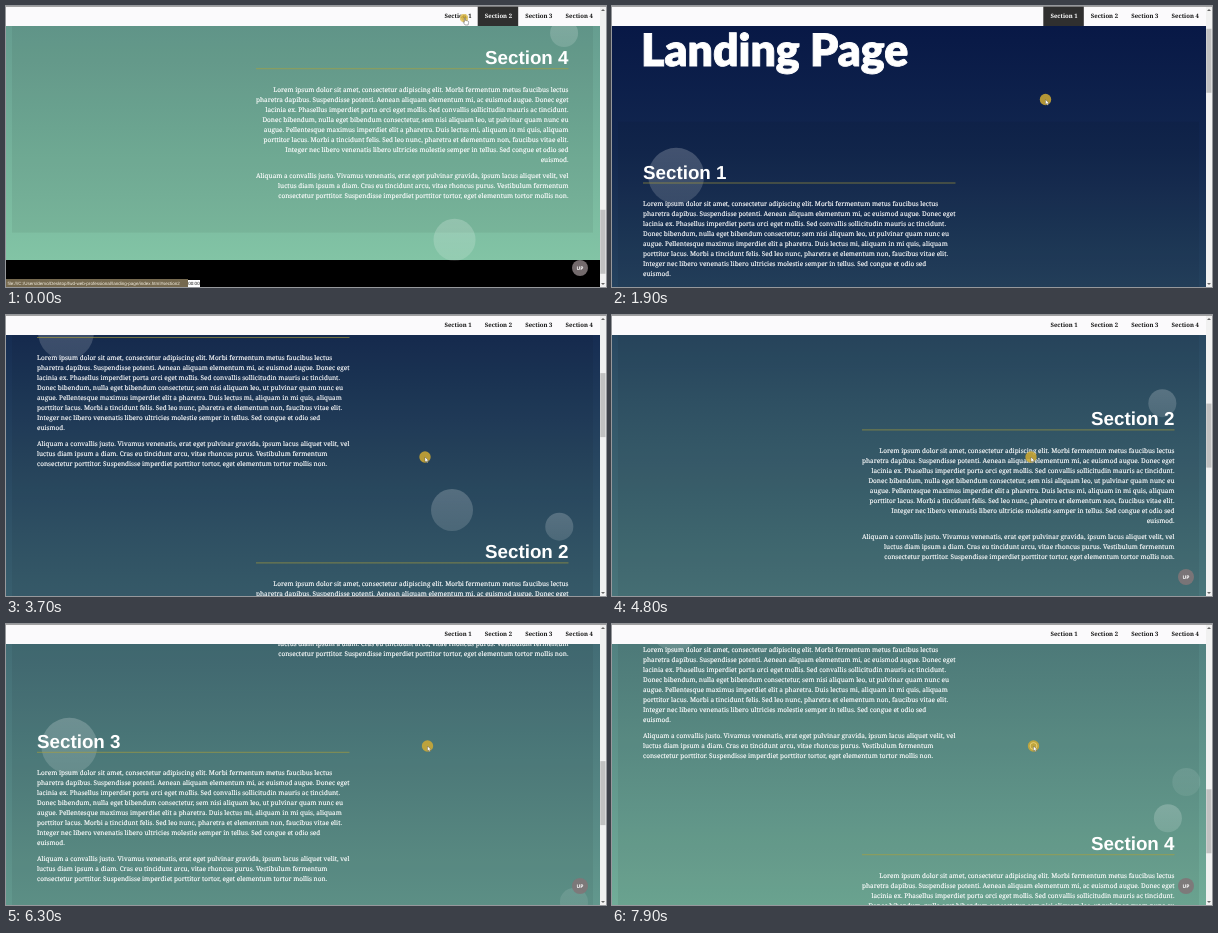
Animation of 600x281 px, one loop 8 s. Source, as an HTML page:

```html
<!DOCTYPE html>
<html lang="en">
<head>
<meta charset="utf-8">
<title>Landing page scroll</title>
<style>
  html, body { margin: 0; width: 100%; height: 100%; overflow: hidden; background: #000; }
  svg { display: block; width: 600px; height: 281px; }
  text { text-rendering: geometricPrecision; white-space: pre; }
  .title { font: 900 44.6px Lato, "Open Sans", sans-serif; fill: #fff; stroke: #fff; stroke-width: .9px; }
  .head { font: bold 18.8px "Liberation Sans", Arial, sans-serif; fill: #fff; }
  .copy { font: 6.45px "Noto Serif", serif; fill: #fff; stroke: #fff; stroke-width: .14px; }
  .link { font: bold 6px "Noto Serif", serif; }
  .up { font: bold 5px "Open Sans", sans-serif; fill: #fff; }
  .status { font: 4.55px "Liberation Sans", Arial, sans-serif; }
</style>
</head>
<body>
<svg id="stage" viewBox="0 0 600 281">
  <defs>
    <linearGradient id="sky" x1="0" y1="0" x2="0" y2="1">
      <stop offset="0" stop-color="#000d3f"/>
      <stop offset=".2" stop-color="#12274f"/>
      <stop offset=".4" stop-color="#315468"/>
      <stop offset="1" stop-color="#82c4a5"/>
    </linearGradient>
    <linearGradient id="bubble" x1="0" y1="0" x2="0" y2="1">
      <stop offset="0" stop-color="#fff" stop-opacity=".21"/>
      <stop offset="1" stop-color="#fff" stop-opacity=".14"/>
    </linearGradient>
  </defs>
</svg>
<script>
const LOOP = 8000, STEP = 100;
const FIRST_RULE = 254, PITCH = 225.4, PAGE_END = 1122;

const COPY = [
  "Lorem ipsum dolor sit amet, consectetur adipiscing elit. Morbi fermentum metus faucibus lectus",
  "pharetra dapibus. Suspendisse potenti. Aenean aliquam elementum mi, ac euismod augue. Donec eget",
  "lacinia ex. Phasellus imperdiet porta orci eget mollis. Sed convallis sollicitudin mauris ac tincidunt.",
  "Donec bibendum, nulla eget bibendum consectetur, sem nisi aliquam leo, ut pulvinar quam nunc eu",
  "augue. Pellentesque maximus imperdiet elit a pharetra. Duis lectus mi, aliquam in mi quis, aliquam",
  "porttitor lacus. Morbi a tincidunt felis. Sed leo nunc, pharetra et elementum non, faucibus vitae elit.",
  "Integer nec libero venenatis libero ultricies molestie semper in tellus. Sed congue et odio sed",
  "euismod.",
  "Aliquam a convallis justo. Vivamus venenatis, erat eget pulvinar gravida, ipsum lacus aliquet velit, vel",
  "luctus diam ipsum a diam. Cras eu tincidunt arcu, vitae rhoncus purus. Vestibulum fermentum",
  "consectetur porttitor. Suspendisse imperdiet porttitor tortor, eget elementum tortor mollis non."
];

// [time, value...]
const SCROLL = [[0, 868], [200, 868], [300, 800], [400, 600], [500, 370], [600, 240], [700, 192],
  [1300, 192], [1800, 77.5], [2900, 77.5], [3700, 232], [4800, 365], [6300, 577], [7900, 700]];
const POINTER = [[0, 458, 12], [900, 458.5, 12], [1100, 458, 12], [1500, 448, 45], [2300, 419, 142],
  [4900, 419, 142], [5800, 421.5, 122]];

// Orbiting bubbles: section, centre x, y from the rule, radius, start angle, degrees per second
const BUBBLES = [
  { sec: 0, x: 60, y: -11, r: 28, phase: -22, speed: 225 },
  { sec: 0, x: 446, y: 179, r: 21, phase: 67, speed: -237 },
  { sec: 1, x: 555, y: -30, r: 14, phase: 9, restart: 141, speed: 225 },
  { sec: 2, x: 60, y: -11, r: 28, phase: 79, speed: 225 },
  { sec: 2, x: 569, y: 156, r: 14, phase: -46, speed: -180, alpha: .5 },
  { sec: 3, x: 555, y: -30, r: 14, phase: 301, speed: 225 },
  { sec: 3, x: 446, y: 177, r: 21, phase: 295, speed: -237 }
];
const ORBIT = 6;

const stage = document.getElementById("stage");

function add(parent, tag, attrs, text) {
  const el = document.createElementNS("http://www.w3.org/2000/svg", tag);
  set(el, attrs);
  if (text) el.textContent = text;
  parent.append(el);
  return el;
}
function set(el, attrs) {
  for (const key in attrs) el.setAttribute(key, attrs[key]);
}
const rect = (parent, x, y, width, height, fill, more) =>
  add(parent, "rect", { x, y, width, height, fill, ...more });
const show = (el, on) => set(el, { visibility: on ? "visible" : "hidden" });
const ruleY = i => FIRST_RULE + PITCH * i;

function valueAt(table, t) {
  const next = table.findIndex(row => row[0] > t);
  if (next < 0) return table[table.length - 1].slice(1);
  const a = table[next - 1], b = table[next];
  const k = (t - a[0]) / (b[0] - a[0]);
  return a.slice(1).map((v, i) => v + (b[i + 1] - v) * k);
}

// Scrolling page
const page = add(stage, "g", {});
rect(page, 0, 0, 594, PAGE_END, "url(#sky)");
rect(page, 0, PAGE_END, 594, 40, "#000");
for (let i = 0; i < 4; i++) rect(page, 6, ruleY(i) - 61, 581, PITCH, "#000", { opacity: .06 });

const bubbles = BUBBLES.map(b =>
  add(page, "circle", { r: b.r, fill: "url(#bubble)", opacity: b.alpha || 1 }));

add(page, "text", { x: 29, y: 137.5, class: "title" }, "Landing Page");
for (let i = 0; i < 4; i++) {
  const even = i % 2, y = ruleY(i);
  const side = { x: even ? 562.5 : 31, "text-anchor": even ? "end" : "start" };
  add(page, "text", { ...side, y: y - 4, class: "head" }, "Section " + (i + 1));
  rect(page, even ? 250 : 31, y, 312.5, 1, "#b0a036", { opacity: .6 });
  COPY.forEach((line, n) =>
    add(page, "text", { ...side, y: y + 23.3 + n * 10 + (n > 7 ? 6 : 0), class: "copy" }, line));
}

// Fixed navigation
rect(stage, 0, 0, 594, 20, "#fbfafc");
const active = rect(stage, 0, 0, 40.5, 20, "#2f2f2f");
const links = [0, 1, 2, 3].map(i =>
  add(stage, "text", { x: 452 + i * 40.4, y: 12.4, class: "link", "text-anchor": "middle" }, "Section " + (i + 1)));

// Scrollbar
rect(stage, 594, 0, 6, 281, "#f1f1f1");
const thumb = rect(stage, 594.3, 0, 5.2, 64, "#c1c1c1");
add(stage, "path", { d: "M595 5l2-2 2 2zM595 277l2 2 2-2z", fill: "#666" });
rect(stage, 0, 0, 600, .8, "#8b8b8d");

// Back-to-top button
const up = add(stage, "g", {});
add(up, "circle", { cx: 574, cy: 262, r: 8, fill: "#7f7678", opacity: .9 });
add(up, "text", { x: 574, y: 263.9, class: "up", "text-anchor": "middle" }, "UP");

// Link address at the bottom
const status = add(stage, "g", {});
rect(status, 0, 273, 182, 8, "#75694f");
rect(status, 182, 274, 12, 7, "#fff");
const address = add(status, "text", { x: 1.5, y: 278.8, class: "status", fill: "#f4efe2" });
add(status, "text", { x: 188, y: 279, class: "status", fill: "#111", "text-anchor": "middle" }, "00:00");

// Pointer with highlight
const pointer = add(stage, "g", {});
const glow = add(pointer, "circle", { fill: "#d0aa32", opacity: .85 });
const ring = add(pointer, "circle", { r: 3.4, fill: "none", stroke: "#f0d982", "stroke-width": .8 });
const arrow = add(pointer, "path", { d: "M0 0v5l1.2-1 .9 1.8.8-.4-.8-1.7h1.5z", fill: "#fff", stroke: "#333", "stroke-width": .3 });
const hand = add(pointer, "path", {
  d: "M.4 0q.8-.6 1 .4v2l2.5.6q.9.3.7 1.4l-.5 2.6h-3l-2-2.8q.2-.8 1.3.1z",
  fill: "#fff", stroke: "#333", "stroke-width": .4
});

function render(t) {
  const [top] = valueAt(SCROLL, t);
  set(page, { transform: `translate(0 ${-top})` });
  set(thumb, { y: 5 + top * .229 });
  show(up, top > 290);

  BUBBLES.forEach((b, i) => {
    const phase = b.restart && t > 2000 ? b.restart : b.phase;
    const angle = (phase + b.speed * t / 1000) * Math.PI / 180;
    const base = ruleY(b.sec);
    set(bubbles[i], { cx: b.x + ORBIT * Math.cos(angle), cy: base + b.y + ORBIT * Math.sin(angle) });
    show(bubbles[i], base - top > -50);
  });

  const current = t < 200 ? 1 : t < 2000 ? 0 : -1;
  show(active, current >= 0);
  set(active, { x: 431.3 + current * 40.4 });
  links.forEach((l, i) => set(l, { fill: i === current ? "#fff" : "#151515" }));

  const [x, y] = valueAt(POINTER, t);
  const onLink = y < 20, pressed = t < 200;
  set(pointer, { transform: `translate(${x} ${y})` });
  set(glow, { r: pressed ? 4 : 5.7 });
  show(hand, onLink);
  show(arrow, !onLink);
  show(ring, pressed || t >= 7800);

  show(status, onLink);
  address.textContent = "file:///C:/Users/demo/Desktop/fwd-web-professional/landing-page/index.html#section" +
    (pressed ? 2 : 1);
}

const start = performance.now();
function tick() {
  const t = (performance.now() - start) % LOOP;
  render(Math.floor(t / STEP) * STEP);
  requestAnimationFrame(tick);
}
tick();
</script>
</body>
</html>
```
